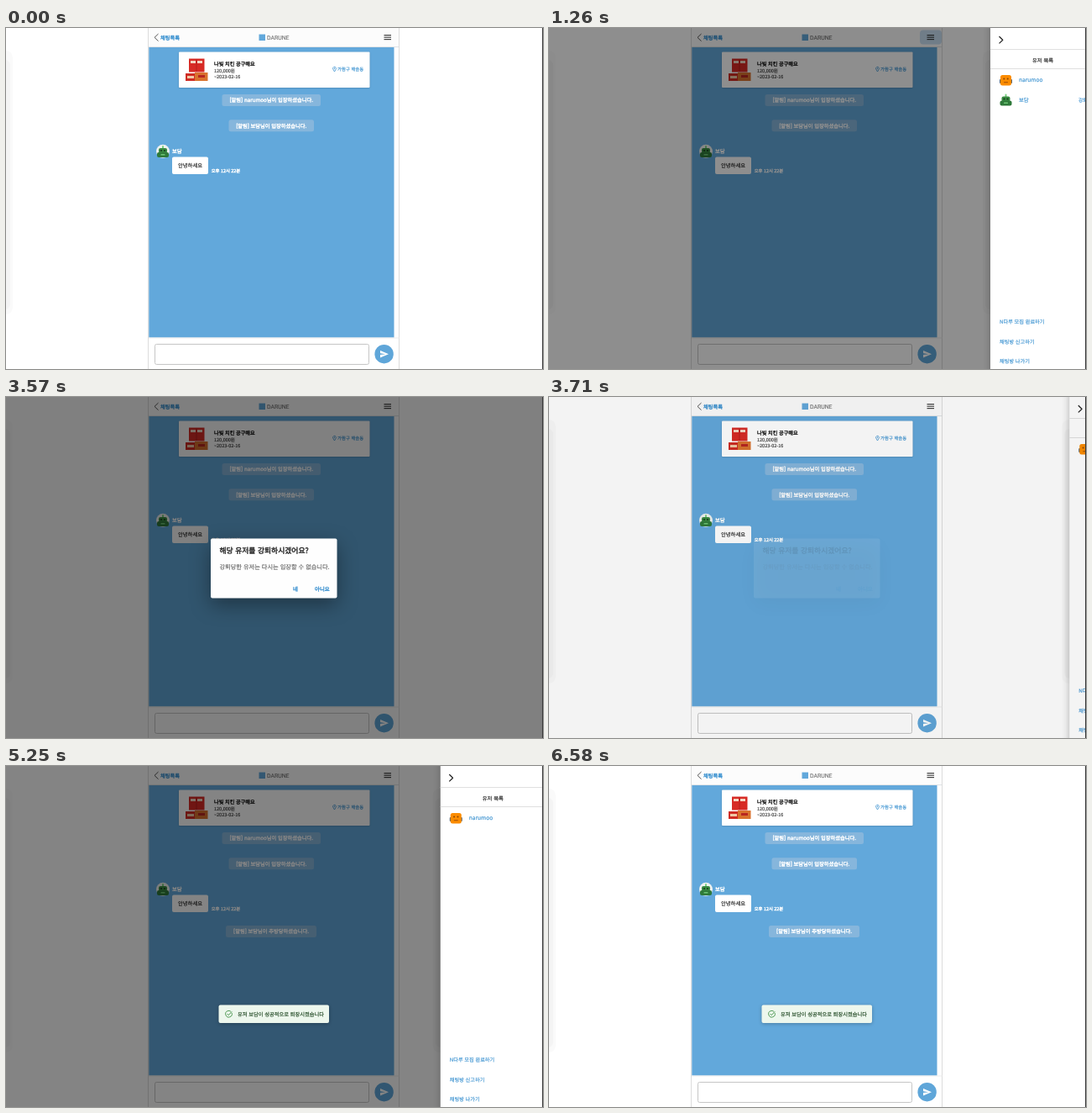
These frames come from a looping animation (640x406 px, 6650 ms). An HTML page with a canvas:

```html
<!DOCTYPE html>
<html lang="ko">
<head>
<meta charset="utf-8">
<style>
html, body { margin: 0; width: 100%; height: 100%; overflow: hidden; background: #fff; }
canvas { display: block; width: 640px; height: 406px; }
</style>
</head>
<body>
<canvas id="stage" width="640" height="406"></canvas>
<script>
const LOOP = 6650;
const BLUE = '#62a8db', LINK = '#3f94d1', INK = '#222';
const SANS = '"Noto Sans CJK KR", "Noto Sans CJK", "Noto Sans", sans-serif';
const MEDIUM = { heft: .4 };
const ctx = document.getElementById('stage').getContext('2d');
ctx.textRendering = 'geometricPrecision';
ctx.lineJoin = 'round';

const clamp = v => Math.min(1, Math.max(0, v));
const ramp = (t, start, length) => clamp((t - start) / length);

function bezier(x1, y1, x2, y2) {
  const at = (a, b, s) => 3 * (1 - s) * (1 - s) * s * a + 3 * (1 - s) * s * s * b + s * s * s;
  return x => {
    let lo = 0, hi = 1;
    for (let i = 0; i < 20; i++) {
      const mid = (lo + hi) / 2;
      if (at(x1, x2, mid) < x) lo = mid; else hi = mid;
    }
    return x <= 0 ? 0 : x >= 1 ? 1 : at(y1, y2, lo);
  };
}
const easeOut = bezier(0, 0, .2, 1);
const easeInOut = bezier(.4, 0, .2, 1);
const sharp = bezier(.4, 0, .6, 1);

function box(x, y, w, h, r, fill, stroke) {
  ctx.beginPath();
  ctx.roundRect(x, y, w, h, r);
  if (fill) { ctx.fillStyle = fill; ctx.fill(); }
  if (stroke) { ctx.strokeStyle = stroke; ctx.lineWidth = 1; ctx.stroke(); }
}

function disc(x, y, r, fill) {
  ctx.beginPath();
  ctx.arc(x, y, r, 0, Math.PI * 2);
  ctx.fillStyle = fill;
  ctx.fill();
}

function line(points, color, width = 1) {
  ctx.beginPath();
  points.forEach(([x, y]) => ctx.lineTo(x, y));
  ctx.strokeStyle = color;
  ctx.lineWidth = width;
  ctx.stroke();
}

// A thin outline gives small type its in-between weights.
function text(str, x, y, size, color, { heft = .15, align = 'left', family = SANS } = {}) {
  ctx.font = `${size}px ${family}`;
  ctx.textAlign = align;
  ctx.textBaseline = 'alphabetic';
  ctx.fillStyle = ctx.strokeStyle = color;
  ctx.lineWidth = heft;
  ctx.fillText(str, x, y + size * .36);
  ctx.strokeText(str, x, y + size * .36);
}

function withAlpha(alpha, draw) {
  if (alpha <= 0) return;
  ctx.save();
  ctx.globalAlpha = alpha;
  draw();
  ctx.restore();
}

function shadowed(color, blur, dy, draw) {
  ctx.save();
  ctx.shadowColor = color;
  ctx.shadowBlur = blur;
  ctx.shadowOffsetY = dy;
  draw();
  ctx.restore();
}

function dim(alpha) {
  ctx.fillStyle = `rgba(0,0,0,${alpha})`;
  ctx.fillRect(0, 0, 640, 406);
}

function edgeShade(x, w) {
  box(x, 27, w, 314, 8, 'rgba(0,0,0,.02)');
  box(x + (x > 0 ? 3 : 0), 38, w - 3, 297, 6, 'rgba(0,0,0,.025)');
}

function greenBot(x, y) {
  box(x - 1, y - 7, 2, 4, 1, '#7ccf83');
  box(x - 5, y - 4, 10, 6, 2, '#398b42');
  box(x - 7, y + 1, 14, 6, 2, '#2f7a3a');
  disc(x - 2, y - 1, 1.1, '#173a1d');
  disc(x + 2, y - 1, 1.1, '#173a1d');
  box(x - 2.5, y + 3, 5, 1.5, .5, '#6cc474');
}

function orangeBot(x, y) {
  box(x - 7.5, y - 1, 15, 5, 1, '#56616b');
  box(x - 6.5, y - 6, 13, 12.5, 2.5, '#fb8c00');
  disc(x - 2.2, y - 1.5, 1, '#8a4508');
  disc(x + 2.2, y - 1.5, 1, '#8a4508');
  box(x - 2.5, y + 2, 5, 1.3, .5, '#b35a06');
}

function notice(str, x, y, w) {
  box(x, y - 7, w, 14, 2.5, '#86b6dc');
  text(str, x + w / 2, y, 6.25, '#fff', { ...MEDIUM, align: 'center' });
}

function header(highlight) {
  ctx.fillStyle = '#fcfcfc';
  ctx.fillRect(170, 0, 299, 23);
  line([[181.5, 7], [177, 11.3], [181.5, 15.6]], '#555', 1);
  text('채팅목록', 184, 11.3, 6.25, LINK, MEDIUM);
  box(301.5, 7.5, 7.5, 7.5, 0, BLUE);
  text('DARUNE', 311, 11.4, 6.9, '#777', { family: 'Roboto, sans-serif' });
  withAlpha(highlight, () => box(442, 2.5, 26, 17, 4, '#c9e0f4'));
  [8.6, 11.1, 13.6].forEach(y => line([[450.5, y], [459, y]], '#333', 1.1));
}

function productCard() {
  shadowed('rgba(0,0,0,.2)', 2, .5, () => box(206, 28.5, 227.5, 42.5, 1, '#fff'));
  box(218, 36.5, 18.5, 16, 0, '#d72b25');
  box(220, 39, 6, 3, 0, '#f4d7c4');
  box(228, 39, 6, 3, 0, '#f4d7c4');
  line([[227, 37], [227, 52]], '#a91c1a', .7);
  box(214, 54, 12, 9, 0, '#cf2c24');
  box(225, 53, 15.5, 10, 0, '#d9722e');
  box(216, 57, 8, 3, 0, '#f0c9a6');
  box(229, 56, 8, 3, 0, '#b82720');
  text('나빛 치킨 공구해요', 248, 43, 6.15, INK, MEDIUM);
  text('120,000원', 248, 51.2, 5.5, '#444');
  text('~2023-02-16', 248, 58.5, 5.5, '#444');
  ctx.beginPath();
  ctx.arc(391.5, 48.2, 1.9, Math.PI * .85, Math.PI * 2.15);
  ctx.lineTo(391.5, 52);
  ctx.closePath();
  ctx.strokeStyle = LINK;
  ctx.lineWidth = .8;
  ctx.stroke();
  disc(391.5, 48.3, .7, LINK);
  text('가람구 해솔동', 395, 49, 5.4, LINK);
}

function page(t) {
  ctx.fillStyle = '#fff';
  ctx.fillRect(0, 0, 640, 406);
  edgeShade(-20, 28);
  const highlight = ramp(t, 540, 180) * .35 + ramp(t, 1000, 120) * .65;
  header(highlight * (1 - ramp(t, 1450, 300)));
  ctx.fillStyle = BLUE;
  ctx.fillRect(170.3, 23, 292.2, 345.5);
  line([[170, 22.5], [469, 22.5]], '#d8dde1', .8);
  line([[169.5, 0], [169.5, 406]], '#dcdcdc');
  line([[468.5, 0], [468.5, 406]], '#dcdcdc');
  line([[170, 369], [469, 369]], '#e8e8e8', .8);

  productCard();
  notice('[알림] narumoo님이 입장하셨습니다.', 257.5, 86, 117.5);
  notice('[알림] 보담님이 입장하셨습니다.', 265.5, 116.3, 101.5);
  if (t >= 3850) notice('[알림] 보담님이 추방당하셨습니다.', 262, 197, 108);

  disc(187, 146.8, 8, '#eef2f0');
  greenBot(187, 147);
  text('보담', 198, 146.3, 6.3, '#fff', MEDIUM);
  box(198, 153.5, 43, 20.5, 2, '#fff');
  text('안녕하세요', 205, 163.7, 6.3, INK);
  text('오후 12시 22분', 244.7, 170.3, 5.35, '#fff', MEDIUM);

  box(177.5, 376.5, 255, 24, 2, '#fff', '#c6c6c6');
  disc(450.6, 388.2, 11.2, '#5fa6d9');
  ctx.beginPath();
  [[446, 384], [456, 388.2], [446, 392.4], [446, 389.1], [452.5, 388.2], [446, 387.3]]
    .forEach(([x, y]) => ctx.lineTo(x, y));
  ctx.fillStyle = '#fff';
  ctx.fill();
}

function drawer(t, open) {
  if (open <= 0) return;
  const x = 640 - 125.5 * open;
  edgeShade(x - 9, 30);
  shadowed('rgba(0,0,0,.3)', 9, 2, () => box(x, -10, 140, 426, 0, '#fff'));
  line([[x + 10.5, 10], [x + 14.8, 14.2], [x + 10.5, 18.4]], INK, 1.2);
  [25.5, 48.5].forEach(y => line([[x, y], [640, y]], '#e0e0e0'));
  text('유저 목록', x + 62.5, 38.3, 6.35, INK, { align: 'center' });
  orangeBot(x + 18.5, 62);
  text('narumoo', x + 34, 61.8, 6.6, LINK);

  if (t < 3600) {
    withAlpha(ramp(t, 1650, 150), () => box(x, 73, 126, 24.5, 0, 'rgba(0,0,0,.045)'));
    greenBot(x + 18.5, 85.5);
    text('보담', x + 34, 85.5, 6.3, LINK);
    text('강퇴', x + 105, 85.5, 5.8, LINK);
    const press = ramp(t, 2090, 200);
    withAlpha(press, () => {
      box(x + 55, 73, 72, 24, 2, 'rgba(0,0,0,.16)');
      disc(x + 110, 85.5, 10 * press, 'rgba(98,168,219,.65)');
    });
  }
  ['N다루 모집 완료하기', '채팅방 신고하기', '채팅방 나가기']
    .forEach((label, i) => text(label, x + 11, 350 + i * 23.3, 6.2, LINK));
}

function dialog() {
  shadowed('rgba(0,0,0,.38)', 24, 8, () => box(244, 168.5, 150.5, 71, 2, '#fff'));
  text('해당 유저를 강퇴하시겠어요?', 254.5, 182.7, 8.8, INK, MEDIUM);
  text('강퇴당한 유저는 다시는 입장할 수 없습니다.', 254.5, 202.3, 7.2, '#666');
  text('네', 342, 228.3, 6.4, LINK, MEDIUM);
  text('아니요', 368, 228.3, 6.4, LINK, MEDIUM);
}

function toast() {
  shadowed('rgba(0,0,0,.25)', 4, 1, () => box(253.5, 284.5, 131.5, 21.5, 2, '#edf7ed'));
  ctx.beginPath();
  ctx.arc(265.5, 295.2, 3.8, -.35, Math.PI * 1.72);
  ctx.strokeStyle = '#3f8f45';
  ctx.lineWidth = .9;
  ctx.stroke();
  line([[263.6, 295], [265.2, 296.7], [269.2, 292.3]], '#3f8f45', .9);
  text('유저 보담이 성공적으로 퇴장시켰습니다', 276, 295.3, 6.25, '#1e4620');
}

// Slide and backdrop share timing but use different curves.
function drawerState(t) {
  const [openAt, closeAt] = t < 3300 ? [1108, 2319] : [3700, 5224];
  const opening = ramp(t, openAt, 250), closing = ramp(t, closeAt, 245);
  return {
    slide: easeOut(opening) - sharp(closing),
    fade: easeInOut(opening) - easeInOut(closing)
  };
}

function render(t) {
  page(t);
  const { slide, fade } = drawerState(t);
  dim(fade * .5);
  drawer(t, slide);

  const modal = easeInOut(ramp(t, 2316, 245)) - easeInOut(ramp(t, 3560, 230));
  dim(modal * .5);
  withAlpha(modal, dialog);

  const grow = easeInOut(ramp(t, 4080, 180));
  withAlpha(grow, () => {
    const scale = .75 + .25 * grow;
    ctx.translate(319, 295);
    ctx.scale(scale, scale);
    ctx.translate(-319, -295);
    toast();
  });
  line([[639.5, 0], [639.5, 406]], '#3a3a3a');
}

const start = performance.now();
function tick() {
  render((performance.now() - start) % LOOP);
  requestAnimationFrame(tick);
}
tick();
</script>
</body>
</html>
```
